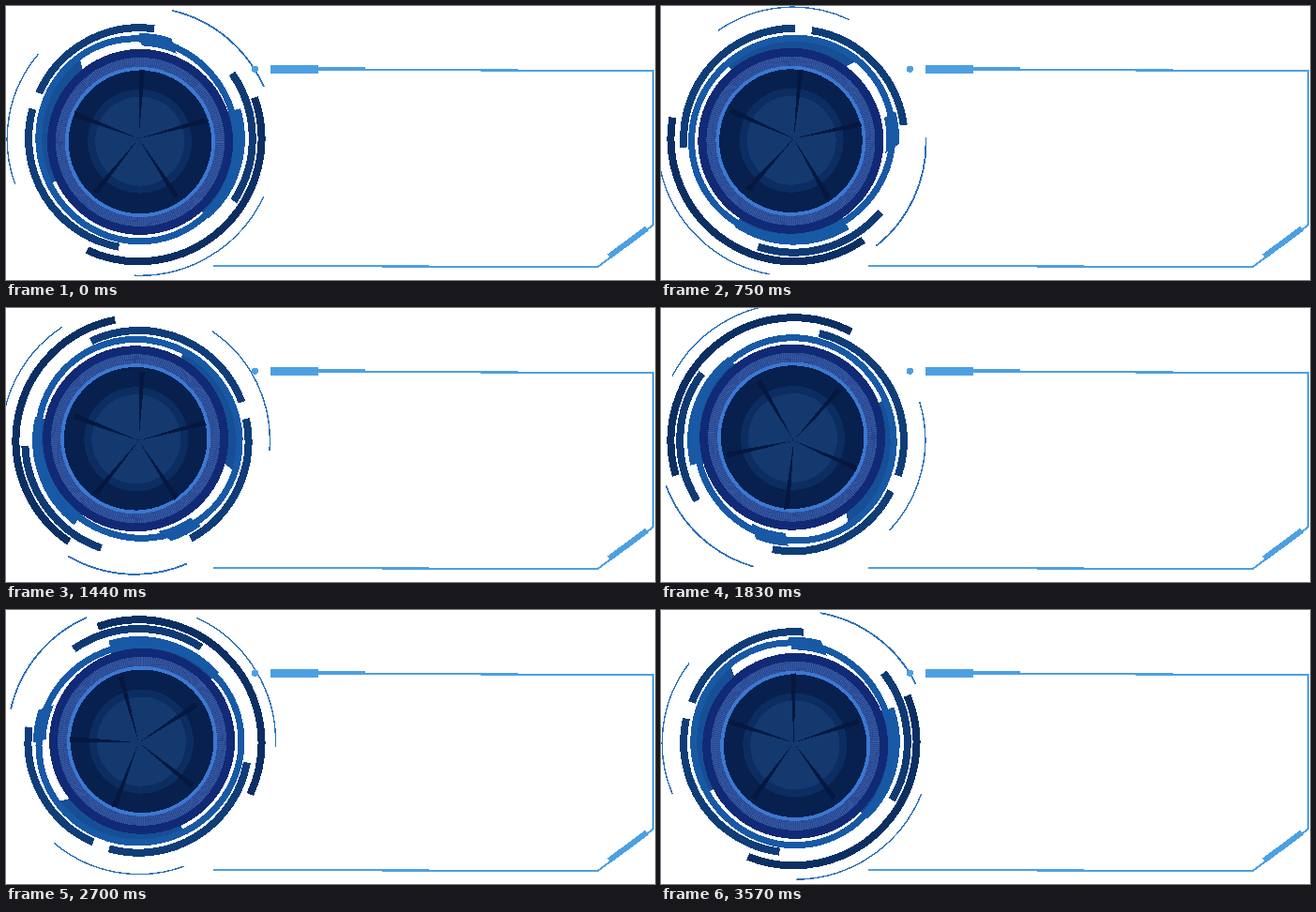
Recreate the animation shown at these times as an HTML page. Size 692 by 292 pixels, loop 3.6 s.

```html
<!DOCTYPE html>
<html>
<head>
<meta charset="utf-8">
<style>
  html, body { margin: 0; width: 100%; height: 100%; overflow: hidden; background: #fff; }
  svg { display: block; }
</style>
</head>
<body>
<svg width="692" height="292" viewBox="0 0 692 292" fill="none" shape-rendering="crispEdges">
  <g id="dial"></g>
  <g id="panel" stroke="#4ca0e2" stroke-width="2">
    <circle cx="265.5" cy="67.3" r="3.6" fill="#4ca0e2" stroke="none"/>
    <rect x="282" y="63" width="51" height="9" rx="1" fill="#4ca0e2" stroke="none"/>
    <path d="M333 67H383" stroke-width="4"/>
    <path d="M383 68H546M506 69H690V233.5L631 278H401M451 277H221"/>
    <path d="M643 267L683.500 237" stroke-width="6"/>
  </g>
</svg>
<script>
const LOOP = 3600, STEP = 30;
const dial = document.getElementById('dial');

function add(tag, attrs) {
  const el = document.createElementNS('http://www.w3.org/2000/svg', tag);
  for (const key in attrs) el.setAttribute(key, attrs[key]);
  dial.append(el);
}

function polar(r, deg, dx = 0, dy = 0) {
  const a = deg * Math.PI / 180;
  return `${r * Math.cos(a) + dx} ${r * Math.sin(a) + dy}`;
}

function arc(r, width, from, to, stroke, dx, dy) {
  add('path', {
    d: `M${polar(r, from, dx, dy)}A${r} ${r} 0 0 1 ${polar(r, to, dx, dy)}`,
    stroke, 'stroke-width': width
  });
}

// Ring sector whose inner and outer edges are [radius, from, to]
function band([r0, a0, b0], [r1, a1, b1], fill) {
  add('path', {
    d: `M${polar(r1, a1)}A${r1} ${r1} 0 0 1 ${polar(r1, b1)}` +
       `L${polar(r0, b0)}A${r0} ${r0} 0 0 0 ${polar(r0, a0)}Z`,
    fill
  });
}

function disc(r, fill, cx = 1.5, cy = 3.6) {
  add('circle', { r, fill, cx, cy });
}

// Hairline arcs around the dial
arc(141, 1.8, -77, -23.5, '#2b70b8', 4, 1);
arc(145.4, 1.4, 25, 92.4, '#2b70b8', 1.2, 0.6);
arc(139.8, 1.4, 160, 220.5, '#2b70b8', -0.5, 0.5);

// Heavy arcs
arc(131, 8, -19.5, 114.9, '#0b2f63');
arc(117.2, 8, 204, 277.7, '#0f3d78', 0.8, -0.8);
arc(121.3, 8, -34.8, 33.3, '#0f3a74');
arc(117.4, 8, 100.4, 195.6, '#0f3d78');

// Blue ring with its thicker sections
band([95, -17, 49], [107, -17, 49], '#164f96');
band([95, 153, 231], [107, 153, 234], '#164f96');
band([99, -88, -66], [112.5, -90, -72], '#1859a6');
arc(108.8, 9, -16.5, 49, '#1859a6');
add('ellipse', {
  rx: 108.5, ry: 105, stroke: '#1859a6', 'stroke-width': 7,
  transform: 'translate(-1.2 1.5) rotate(68)'
});

// Core
disc(99, '#112a75');
disc(90, '#27468f');
add('circle', {
  r: 85, cx: 1.5, cy: 3.6, stroke: '#385ba5', 'stroke-width': 10,
  'stroke-dasharray': '0.9 1.1'
});
disc(80, '#3b78d2');
disc(76.3, '#08204d');
disc(55.5, '#0c2d61', 1.2, 2.8);
disc(47.5, '#13396f', 1.2, 2.8);
for (let i = 0; i < 5; i++) {
  add('path', {
    d: 'M0 0L73 -3.2L74 2.8Z', fill: '#061840',
    transform: `rotate(${-87 + i * 72})`
  });
}

function draw(now) {
  const t = Math.floor(now % LOOP / STEP) * STEP;
  dial.setAttribute('transform', `translate(141.5 141.3) rotate(${t / LOOP * 360})`);
  requestAnimationFrame(() => draw(performance.now()));
}
draw(0);
</script>
</body>
</html>
```
